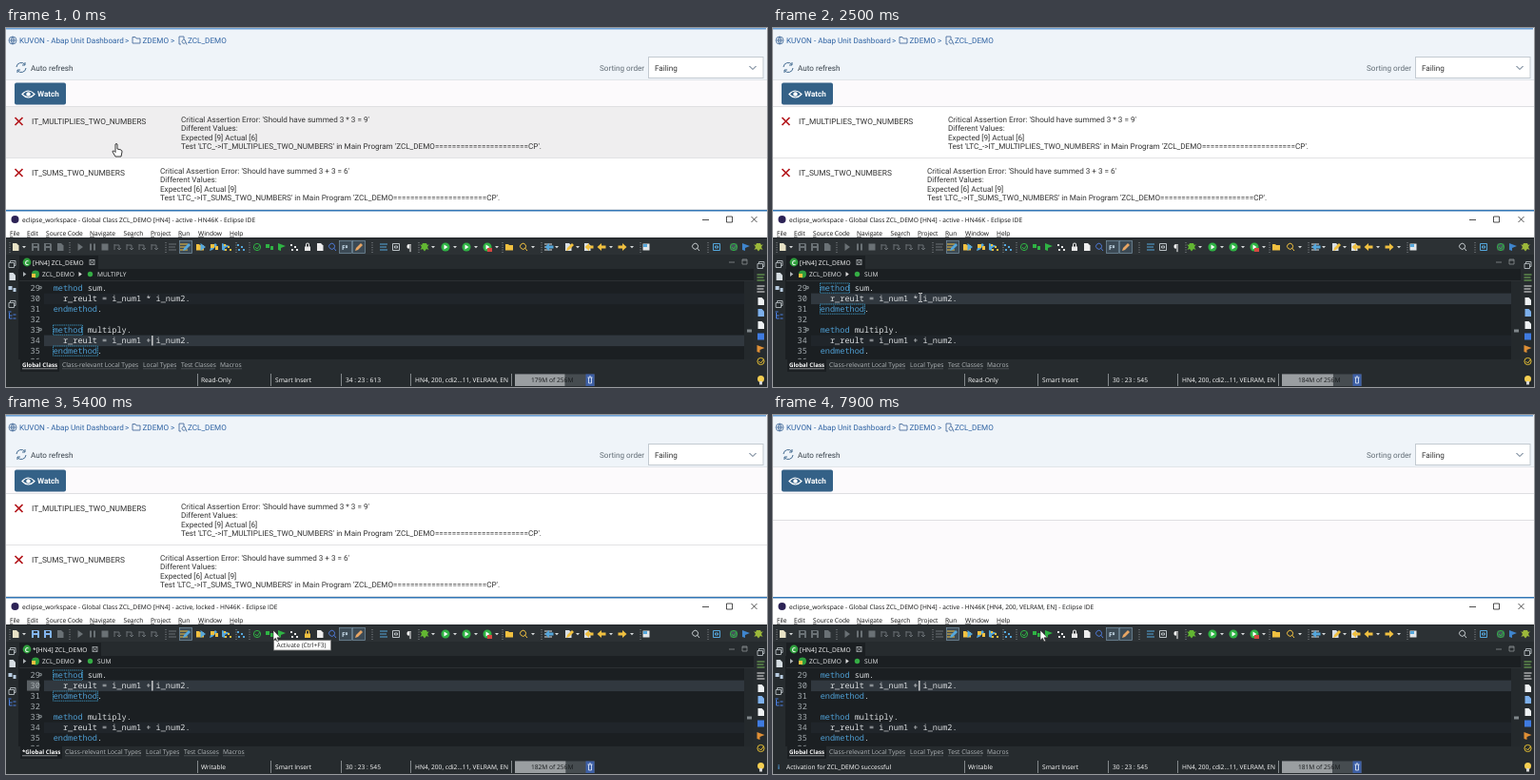
An HTML page that plays this animation: 800x377 px, repeating every 8000 ms.

```html
<!DOCTYPE html>
<html lang="en">
<head>
<meta charset="utf-8">
<title>Unit test dashboard</title>
<style>
html, body { margin: 0; width: 100%; height: 100%; overflow: hidden; background: #fcfafc; }
svg { display: block; width: 800px; height: 377px; text-rendering: geometricPrecision; }
text { white-space: pre; }
.web { font: 8.15px Roboto, sans-serif; }
.name { font: 8.35px Roboto, sans-serif; }
.ui { font: 6.64px "Open Sans", "Noto Sans", sans-serif; }
.code { font: 8.57px "Noto Sans Mono", monospace; }
.strong { font-weight: 700; }
</style>
</head>
<body>
<svg id="stage" viewBox="0 0 800 377"></svg>
<script>
const LOOP = 8000;
const CLICK = 1900, EDIT = 3000, TYPED = 3260, ACTIVATE = 5900, DONE = 7300, CLEARED = 7500;
const SYSTEM = 'HN4', PROJECT = 'HN46K', USER = 'VELRAM';
const LIGHT = '#e6e8e9', BLUE = '#55a7dc', GREEN = '#2fb344', YELLOW = '#f0c040', GRAY = '#6a7175';
const INK = '#1b1f22', BAR = '#2c3134', PANEL = '#262b2e';

const stage = document.getElementById('stage');

function add(tag, attrs = {}, parent = stage) {
  const el = document.createElementNS('http://www.w3.org/2000/svg', tag);
  for (const key in attrs) el.setAttribute(key, attrs[key]);
  return parent.appendChild(el);
}
const group = (parent = stage) => add('g', {}, parent);
const rect = (x, y, width, height, fill, parent, more) =>
  add('rect', { x, y, width, height, fill, ...more }, parent);
const dot = (cx, cy, r, fill, parent) => add('circle', { cx, cy, r, fill }, parent);
const line = (d, stroke, width = 1, parent, more) =>
  add('path', { d, stroke, 'stroke-width': width, fill: 'none', ...more }, parent);
function text(x, y, str, cls, fill, parent, more) {
  const el = add('text', { x, y, class: cls, fill, ...more }, parent);
  el.textContent = str;
  return el;
}
const show = (el, on) => el.setAttribute('display', on ? 'inline' : 'none');
const put = (el, str) => { if (el.textContent !== str) el.textContent = str; };

// Small icons, drawn around their centre: filled shapes and stroked shapes.
const FILLED = {
  doc: 'M-3-4H1L3.5-1.5V4H-3Z',
  disk: 'M-4-4H3L4-3V4H-4ZM-2-3V-1H2V-3ZM-2 1V4H2V1Z',
  box: 'M-3.5-3.5H3.5V3.5H-3.5Z',
  play: 'M-2.5-4L3 0L-2.5 4Z',
  pause: 'M-3-3.5H-1V3.5H-3ZM1-3.5H3V3.5H1Z',
  caret: 'M-2-1H2L0 1.3Z',
  left: 'M-4.5 0L0-4V-1.5H4.5V1.5H0V4Z',
  right: 'M4.5 0L0-4V-1.5H-4.5V1.5H0V4Z',
  folder: 'M-4-3H-1L0-2H4V3.5H-4Z',
  lock: 'M-3-.5H-2V-2.5A2 2 0 0 1 2-2.5V-.5H3V4H-3ZM-1-.5H1V-2.5A1 1 0 0 0-1-2.5Z',
  pencil: 'M-4 4L-3 1L2-4L4-2L-1 3Z',
  flag: 'M-4-4L4-1L-1 1V4L-4 3Z',
  blocks: 'M-4-3H0V1H-4ZM1-1H4V3H1Z',
  bits: 'M-4-3H-2V-1H-4ZM0-1H2V1H0ZM2 2H4V4H2ZM-3 2H-1V4H-3Z',
  bug: 'M-2-4H2L3-2L5-3L3 0L4.5 3L2 2L0 4.5L-2 2L-4.5 3L-3 0L-5-3L-3-2Z'
};
const STROKED = {
  step: 'M-3-3V3M-3-2H2V2M0 1L2 3L4 1',
  lines: 'M-4-3H4M-4 0H3M-4 3H4',
  lens: 'M2 1A3 3 0 1 1 2-2.5A3 3 0 0 1 2 1ZM1.5 1L4 4',
  ring: 'M-3.6 0A3.6 3.6 0 1 0 3.6 0A3.6 3.6 0 1 0-3.6 0M-2 0L0 2L3-2',
  win: 'M-3.5-1.5H2V3.5H-3.5ZM-2-1.5V-3.5H3.5V1.5H2',
  square: 'M-3.5-3.5H3.5V3.5H-3.5ZM-1.5-1H1.5V1H-1.5Z',
  tree: 'M-3-3V3H0M-3 0H0M1-1H4M1 3H4M-4-4H-1'
};
function icon(name, x, y, color, parent, scale = 1) {
  const attrs = { transform: `translate(${x} ${y}) scale(${scale})` };
  if (name === 'run') {
    const g = add('g', attrs, parent);
    dot(0, 0, 4.5, color, g);
    return add('path', { d: 'M-1.5-2.5L2.5 0L-1.5 2.5Z', fill: '#fff' }, g);
  }
  return FILLED[name]
    ? add('path', { ...attrs, d: FILLED[name], fill: color, 'fill-rule': 'evenodd' }, parent)
    : line(STROKED[name], color, 1, parent, attrs);
}

// Dashboard page
rect(0, 0, 800, 192, '#fcfafc');
rect(0, 0, 800, 54.5, '#eff4f9');
rect(0, 0, 799, 1.5, '#6a9fd6');
line('M0 54.5H800', '#e1e5e9');
line('M3 13A4 4 0 1 1 11 13A4 4 0 1 1 3 13M3 13H11M7 9V17M7 9Q3.5 13 7 17Q10.5 13 7 9', '#4a6f9d', .8);
const crumb = (x, str) => text(x, 16, str, 'web', '#2f63a3');
crumb(14, 'KUVON - Abap Unit Dashboard');
crumb(125, '>');
line('M133 10V16H141V11H137L136 9.5H133Z', '#4a6f9d', .9);
crumb(143.5, 'ZDEMO');
crumb(173, '>');
line('M182 9H187V12M182 9V17H184', '#4a6f9d', .9);
line('M188.6 15.5A2 2 0 1 1 188 12.5L190 17.5', '#4a6f9d', .9);
crumb(191, 'ZCL_DEMO');
line('M11 41A5 5 0 0 1 20 38.5M20 36V39H17M21 42A5 5 0 0 1 12 44.5M12 47V44H15', '#456c91', 1);
text(26, 44.6, 'Auto refresh', 'web', '#38424b');
text(624, 44.6, 'Sorting order', 'web', '#626d76');
rect(675.5, 30.5, 120.5, 22, '#fff', stage, { stroke: '#c3cad1' });
text(682, 44.6, 'Failing', 'web', '#333');
line('M781.5 40L785 43.5L788.5 40', '#4a6078', 1);
rect(9, 57.5, 54, 23, '#346187', stage, { rx: 2 });
line('M17 69.5Q23.5 62.5 30 69.5Q23.5 76.5 17 69.5Z', '#fff', 1.2);
dot(23.5, 69.5, 2.2, '#fff');
text(33, 72.3, 'Watch', 'web strong', '#fff');
line('M0 82.5H800', '#dfdfe2');
const pollDots = [69.5, 79, 88.5].map(x => dot(x, 69.5, 2, '#62b8ea'));

const results = group();
function failure(top, x, name, op, expected, actual) {
  const bg = rect(0, top, 800, 53, '#fff', results);
  line(`M0 ${top + 53.5}H800`, '#e2e2e4', 1, results);
  const y = top + 15;
  line(`M9.5 ${y - 4}L17.5 ${y + 4}M17.5 ${y - 4}L9.5 ${y + 4}`, '#b3161b', 1.7, results);
  text(27, y + 3.4, name, 'name', '#333', results);
  [`Critical Assertion Error: 'Should have summed 3 ${op} 3 = ${expected}'`,
   'Different Values:',
   `Expected [${expected}] Actual [${actual}]`,
   `Test 'LTC_->${name}' in Main Program 'ZCL_DEMO${'='.repeat(22)}CP'.`
  ].forEach((str, i) => text(x, y + 1 + i * 9.25, str, 'web', '#333', results));
  return bg;
}
const rows = [
  failure(83, 184, 'IT_MULTIPLIES_TWO_NUMBERS', '*', 9, 6),
  failure(137, 162, 'IT_SUMS_TWO_NUMBERS', '+', 6, 9)
];
const emptyRow = group();
rect(0, 83, 800, 27, '#fff', emptyRow);
line('M0 110.5H800', '#dfdfe2', 1, emptyRow);

// IDE window
rect(0, 192, 800, 185, INK);
rect(0, 192, 800, 28, '#fff');
line('M0 191.7H800', '#3276b5', 1.4);
dot(9.5, 201, 4, '#2c2255');
const title = text(17, 203.6, '', 'ui', '#111');
line('M732 201.5H739M757.5 198H763.5V204H757.5ZM783.5 198L789.5 204M789.5 198L783.5 204', '#222', .8);
[[4, '_File'], [22, '_Edit'], [42, '_Source Code'], [88, '_Navigate'], [123.5, 'Se_arch'],
 [152, '_Project'], [181, '_Run'], [202, '_Window'], [235, '_Help']].forEach(([x, str]) => {
  const [before, rest] = str.split('_');
  const el = text(x, 217.8, before, 'ui', '#111');
  add('tspan', { 'text-decoration': 'underline' }, el).textContent = rest[0];
  add('tspan', {}, el).textContent = rest.slice(1);
});

rect(0, 220.5, 800, 17.5, BAR);
[4, 67, 168, 242, 256, 385, 434, 522, 563, 667, 738].forEach(x =>
  line(`M${x} 225V236`, '#888e91', 1, stage, { 'stroke-dasharray': '1 1.5' }));
const pressed = (x, parent) =>
  rect(x, 223.5, 13, 13, '#3c4a55', parent, { stroke: '#7893a6', 'stroke-width': .7 });
pressed(182.5);
pressed(364.5);
const bar = (name, x, color, parent) => icon(name, x, 230, color, parent);
[['doc', 10, '#e8e2c5'], ['play', 78, GRAY], ['pause', 91, GRAY], ['box', 104, GRAY],
 ['step', 117, GRAY], ['step', 130, GRAY], ['step', 143, GRAY], ['step', 156, GRAY], ['lines', 175, GRAY],
 ['lines', 187, YELLOW], ['pencil', 190, BLUE], ['folder', 204, YELLOW], ['play', 207, BLUE],
 ['pencil', 218, BLUE], ['blocks', 219, YELLOW], ['flag', 231, BLUE], ['bits', 233, YELLOW],
 ['bits', 247, BLUE], ['ring', 264, GREEN], ['bits', 303, '#ececec'], ['doc', 330, '#eee'],
 ['lens', 343, '#4d78d4'], ['pencil', 371, '#e7a564'],
 ['lines', 397, BLUE], ['square', 410, '#b9c0c4'], ['bug', 440, '#62b632'], ['run', 462, GREEN],
 ['run', 484, GREEN], ['run', 506, GREEN], ['folder', 529, YELLOW], ['lens', 544, YELLOW],
 ['lines', 570, '#d9dfe4'], ['left', 571, BLUE], ['doc', 591, '#d9dfe4'], ['pencil', 593, YELLOW],
 ['doc', 611, '#d9dfe4'], ['left', 613, YELLOW], ['left', 626, YELLOW], ['right', 648, YELLOW],
 ['box', 673, '#e2e6e9'], ['lens', 725, '#c4cacd'], ['square', 747, BLUE], ['box', 765, '#46535b'],
 ['ring', 765, GREEN], ['flag', 778, '#3f85cd'], ['bug', 791, '#9cb83a']
].forEach(([name, x, color]) => bar(name, x, color));
[19, 449, 472, 494, 516, 554, 579, 601, 636, 658].forEach(x => bar('caret', x, '#d7dadb'));
rect(506, 231, 5, 4, '#d54840');
rect(670, 227, 4, 3, BLUE);
text(421, 233.5, '¶', 'ui', '#fff', stage, { style: 'font-size:9px' });
const saveIcons = [31, 44].map(x => bar('disk', x, GRAY));
bar('doc', 57, GRAY);
const activateIcons = [bar('blocks', 277, GREEN), bar('flag', 290, GREEN)];
const lockIcon = bar('lock', 317, '#e8e8e8');
const toggle = group();
pressed(350.5, toggle);
text(353, 232.5, 'F⁰', 'ui strong', '#cfe3f2', toggle);
const toggleOff = bar('bits', 357, GRAY);

// Editor tab, breadcrumb and side strips
rect(0, 238, 800, 15, PANEL);
rect(0, 238, 13, 123, PANEL);
rect(786, 238, 14, 123, PANEL);
const tabBg = rect(14, 239, 83, 14, INK);
dot(22, 246, 4.4, '#2f9e3d');
text(19.8, 248.6, 'C', 'ui strong', '#fff');
const tabName = text(28, 248.6, '', 'ui', '#fff');
const tabClose = line('M-2.5-2.5H2.5V2.5H-2.5ZM-2.5-2.5L2.5 2.5M2.5-2.5L-2.5 2.5', '#b9bec1', .7);
line('M760 246H766M774 243H779V248H774ZM774 244H779', '#8b9194', .8);
icon('play', 19.5, 258.5, '#aeb3b6', stage, .6);
dot(31, 258.5, 4, '#2f9e3d');
rect(27, 258, 4, 4, YELLOW);
text(38, 261.2, 'ZCL_DEMO', 'ui', LIGHT);
icon('play', 78, 258.5, '#ddd', stage, .6);
dot(88.5, 258.5, 2.7, '#35ad45');
const method = text(96, 261.2, '', 'ui', LIGHT);
line('M14 265.5H786', '#2b3033');
[['win', 248, '#a7aeb2'], ['doc', 261, '#d7dee3'], ['blocks', 274, '#b8cce0'],
 ['win', 290, '#a7aeb2'], ['tree', 302, '#4b7fe0']].forEach(([name, y, color]) => icon(name, 6.5, y, color));
[['win', 249, '#a7aeb2'], ['lines', 262, '#79b85a'], ['lines', 274, '#eee'], ['doc', 287, '#eef1f3'],
 ['doc', 299, '#7db0ec'], ['doc', 312, '#eef1f3'], ['box', 324, '#3f7be0'], ['flag', 337, '#e08f35'],
 ['ring', 350, '#e3bd33']].forEach(([name, y, color]) => icon(name, 793.5, y, color));

// Source code, 11px per line
const lineY = n => 275.6 + (n - 29) * 11;
const highlights = [30, 34].map(n => rect(40, lineY(n) - 8, 736, 11.5, '#22282c'));
const changedMark = rect(22, lineY(30) - 8, 13, 11, '#5a6064');
const code = [
  ['method', ' sum.'], ['', ''], ['endmethod', '.'], ['', ''],
  ['method', ' multiply.'], ['', '  r_reult = i_num1 + i_num2.'], ['endmethod', '.']
].map(([keyword, rest], i) => {
  const n = 29 + i;
  text(25.5, lineY(n), n, 'code', '#a4abaf');
  const el = text(49.7, lineY(n), '', 'code', '#d9dcde');
  add('tspan', { fill: '#4f9fd4' }, el).textContent = keyword;
  const tail = add('tspan', {}, el);
  tail.textContent = rest;
  return tail;
});
text(25.5, lineY(36), '36', 'code', '#a4abaf');
const folds = group();
[29, 33].forEach(n => {
  const y = lineY(n) - 3;
  dot(36, y, 1.9, '#7b8285', folds);
  line(`M35 ${y}H37`, INK, .6, folds);
});
const boxes = [29, 33].map(n => {
  const g = group();
  [[n, 31], [n + 2, 47]].forEach(([k, w]) =>
    rect(49.5, lineY(k) - 7.6, w, 10.2, 'none', g,
      { stroke: '#3fa0cf', 'stroke-width': .8, 'stroke-dasharray': '1.5 .7' }));
  return g;
});
const caret = rect(153.3, 0, 1.1, 10.5, '#fff');
rect(776, 266, 10, 82, '#24292c');
rect(779, 316.5, 5, 3, '#80878b');

// Bottom tabs and status bar
rect(13, 348, 773, 13, PANEL);
const activeTab = rect(15, 348, 41, 13, INK);
const bottomFirst = text(17, 355.8, '', 'ui strong', '#fff', stage, { style: 'font-size:6.2px' });
const bottomRest = group();
[[59, 'Class-relevant Local Types', 139], [144, 'Local Types', 179], [184, 'Test Classes', 220], [225, 'Macros', 248]]
  .forEach(([x, str, end]) => {
    text(x, 355.8, str, 'ui', '#b5babd', bottomRest);
    line(`M${x} 357.8H${end}`, '#80878b', .4, bottomRest);
  });
line('M17 357.8H54', '#d5d8da', .6);
rect(0, 361, 800, 16, PANEL);
[201, 278, 352, 425, 531].forEach(x => line(`M${x}.5 363V376`, '#9da2a5', .8));
const status = (x, str = '', fill = '#fff') => text(x, 371.6, str, 'ui', fill);
const done = group();
text(5, 372, 'i', 'ui strong', '#58a6e8', done);
text(14, 371.6, 'Activation for ZCL_DEMO successful', 'ui', '#fff', done);
const access = status(205);
status(283, 'Smart Insert');
const position = status(357);
status(430, `${SYSTEM}, 200, cdi2...11, ${USER}, EN`);
rect(535, 363.5, 84, 12.5, '#464c50');
const heapBar = rect(535, 363.5, 55, 12.5, '#9a9ea1');
const heap = status(552, '', '#16191b');
rect(609.5, 363.5, 9, 12.5, '#3d5fa5');
line('M611.5 367H616.5M612.5 367V373H615.5V367M613 366H615', '#d9e3f3', .9);
const progress = group();
text(623, 371.6, `Activating [${SYSTEM}] ZCL_DE...Global Class)`, 'ui', '#fff', progress);
rect(750, 366, 17, 7.5, '#22b14c', progress);
rect(770.5, 366, 8, 7.5, '#22b14c', progress);
rect(774, 368, 4, 3.5, '#e8eee9', progress);
dot(793.5, 368.5, 3.5, '#f5cf51');
rect(792, 371, 3, 3.5, '#d9d9d9');

const tooltip = group();
rect(281.5, 236.5, 60, 10.5, '#fff', tooltip, { stroke: '#777', 'stroke-width': .8 });
text(284.5, 244, 'Activate (Ctrl+F3)', 'ui', '#222', tooltip);

// Pointers, drawn with the hot spot at the origin
const pointers = {
  hand: add('path', { d: 'M-1 0Q0-1 1 0V5L5 6Q6 6.5 6 8L5 13H-1L-4 8Q-4 6.5-2.5 7L-1 8.5Z', fill: '#fff', stroke: '#222', 'stroke-width': .9 }),
  beam: line('M-2-4.5H-.5L0-4L.5-4.5H2M0-4V4M-2 4.5H-.5L0 4L.5 4.5H2', '#f4f4f4', .8),
  arrow: add('path', { d: 'M0 0V10.5L2.4 8.3L4 12L5.6 11.3L4 7.8H7.4Z', fill: '#fff', stroke: '#222', 'stroke-width': .6 })
};
const PATH = [[0, 116, 122], [300, 116, 122], [1200, 155, 283], [3600, 155, 283],
  [4250, 293, 227], [4400, 293, 227], [4750, 281, 226], [LOOP, 281, 226]];
function pointerAt(t) {
  const i = PATH.findIndex(p => p[0] > t);
  const [t0, x0, y0] = PATH[i - 1], [t1, x1, y1] = PATH[i];
  const u = (t - t0) / (t1 - t0), ease = u * u * (3 - 2 * u);
  return [x0 + (x1 - x0) * ease, y0 + (y1 - y0) * ease];
}

function drawPointer(t) {
  const [x, y] = pointerAt(t);
  const kind = y < 190 ? 'hand' : y > 265 && y < 348 ? 'beam' : 'arrow';
  const typing = t >= EDIT && t < 3600;
  for (const name in pointers) {
    show(pointers[name], name === kind && !typing);
    pointers[name].setAttribute('transform', `translate(${x} ${y})`);
  }
  rows.forEach((row, i) => {
    const top = 83 + i * 54;
    row.setAttribute('fill', y >= top && y < top + 53 ? '#efeeef' : '#fff');
  });
}

const HEAP = [[0, 179], [450, 180], [850, 181], [1250, 182], [1800, 183], [2350, 184], [2900, 185], [3500, 180],
  [4100, 181], [5000, 182], [5700, 183], [6000, 184], [6400, 185], [6800, 186], [7300, 181]];

function draw(t) {
  const inSum = t >= CLICK, edited = t >= EDIT, activating = t >= ACTIVATE && t < DONE, finished = t >= DONE;
  const dirty = edited && t < ACTIVATE;

  show(results, t < CLEARED);
  show(emptyRow, t >= CLEARED);
  const polling = (t >= 4100 && t < 4600) || (t >= 6800 && t < 7300);
  pollDots.forEach((el, i) => {
    show(el, polling);
    el.setAttribute('r', 2.3 + .9 * Math.cos((t - 4300) / 900 * 2 * Math.PI - i * 1.2));
  });

  const state = dirty ? 'active, locked' : activating ? 'inactive' : 'active';
  const client = finished ? ` [${SYSTEM}, 200, ${USER}, EN]` : '';
  put(title, `eclipse_workspace - Global Class ZCL_DEMO [${SYSTEM}] - ${state} - ${PROJECT}${client} - Eclipse IDE`);
  put(tabName, `${dirty ? '*' : ''}[${SYSTEM}] ZCL_DEMO`);
  tabName.style.fontStyle = activating ? 'italic' : 'normal';
  const shift = dirty ? 3 : 0;
  tabBg.setAttribute('width', 83 + shift);
  tabClose.setAttribute('transform', `translate(${90.5 + shift} 246)`);
  put(bottomFirst, `${dirty ? '*' : ''}Global Class`);
  activeTab.setAttribute('width', 41 + shift);
  bottomRest.setAttribute('transform', `translate(${shift} 0)`);

  saveIcons.forEach(el => el.setAttribute('fill', dirty ? '#83b5ee' : GRAY));
  activateIcons.forEach(el => el.setAttribute('fill', activating ? GRAY : GREEN));
  lockIcon.setAttribute('fill', dirty || activating ? YELLOW : '#e8e8e8');
  show(toggle, !activating);
  show(toggleOff, activating);

  put(method, inSum ? 'SUM' : 'MULTIPLY');
  put(position, inSum ? '30 : 23 : 545' : '34 : 23 : 613');
  put(access, edited ? 'Writable' : 'Read-Only');
  put(code[1], `  r_reult = i_num1 ${t < EDIT ? '* ' : t < TYPED ? ' ' : '+ '}i_num2.`);
  highlights.forEach((el, i) => el.setAttribute('fill', (i === 0) === inSum ? '#31383f' : '#20252a'));
  show(boxes[0], inSum && !finished);
  show(boxes[1], !inSum);
  show(folds, !finished);
  show(changedMark, edited && !finished);

  // The blink restarts whenever the caret moves or a key is typed.
  const blinkStart = t >= TYPED ? TYPED : inSum ? CLICK : 0;
  caret.setAttribute('y', lineY(inSum ? 30 : 34) - 7.6);
  show(caret, (t - blinkStart) % 1060 < 530);

  const used = HEAP.filter(h => h[0] <= t).pop()[1];
  put(heap, `${used}M of 256M`);
  heapBar.setAttribute('width', 75 * used / 256);
  show(progress, t >= 6100 && t < DONE);
  show(done, finished);
  show(tooltip, t >= 5200 && t < 5800);
  drawPointer(t);
}

const start = performance.now();
function tick() {
  draw((performance.now() - start) % LOOP);
  requestAnimationFrame(tick);
}
draw(0);
requestAnimationFrame(tick);
</script>
</body>
</html>
```
